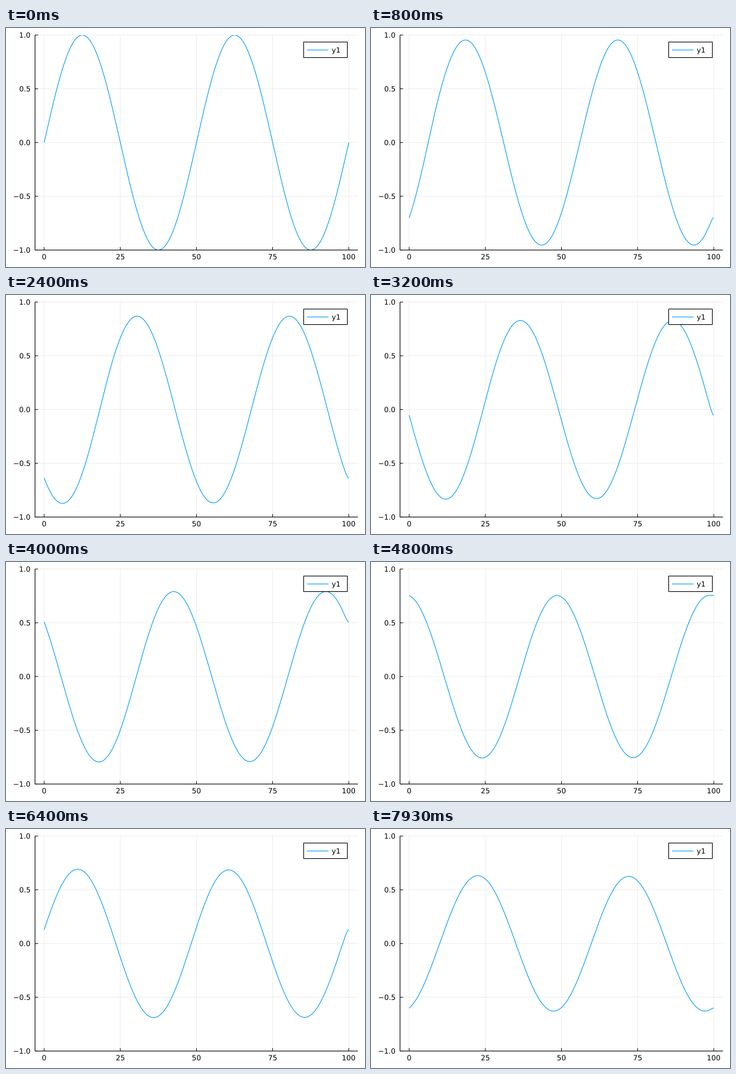
Recreate the animation shown at these times as a matplotlib script. Size 600 by 400 pixels, loop 8 s.

```python
import numpy as np
import matplotlib.pyplot as plt
from matplotlib.animation import FuncAnimation
from matplotlib.patches import PathPatch, Rectangle
from matplotlib.textpath import TextPath
from matplotlib.transforms import Affine2D

W, H, DPI = 600, 400, 100
LOOP, TICK = 8000, 20              # ms
POSES = 120
PX = 72 / DPI                      # one pixel in points
BLUE = "#009afa"
LEFT, RIGHT, TOP, BOTTOM = 48.5, 588.19, 11.81, 371.6
FONT = 12                          # pixels

plt.rcParams["font.family"] = "DejaVu Sans"

# Advection-diffusion: free outflow on the right, fed back in on the left
SPEED, DIFF = 1.0, 0.5
DX, DT, SUBSTEPS = 0.2, 0.01, 50
x = np.linspace(0, 100, 501)


def step(u):
    grad = (u[2:] - u[:-2]) / (2 * DX)
    curve = (u[2:] - 2 * u[1:-1] + u[:-2]) / DX ** 2
    new = u.copy()
    new[1:-1] += DT * (DIFF * curve - SPEED * grad)
    new[-1] = (4 * new[-2] - new[-3]) / 3
    new[0] = new[-1]
    return new


def solve():
    u = np.sin(2 * np.pi * x / 50)
    states = [u]
    for _ in range(POSES - 1):
        for _ in range(SUBSTEPS):
            u = step(u)
        states.append(u)
    return states


def px(v):
    return LEFT + (v + 3) / 106 * (RIGHT - LEFT)


def py(v):
    return BOTTOM - (v + 1) / 2 * (BOTTOM - TOP)


fig = plt.figure(figsize=(W / DPI, H / DPI), dpi=DPI, facecolor="white")
ax = fig.add_axes([0, 0, 1, 1])
ax.set_xlim(0, W)
ax.set_ylim(H, 0)
ax.axis("off")


def stroke(xs, ys, color="black", width=1.0, **kw):
    return ax.plot(xs, ys, color=color, linewidth=width * PX, snap=False,
                   solid_capstyle="butt", **kw)[0]


def label(x0, yc, text, align):
    """Place text by its ink; align is 0 for left, 0.5 for centre, 1 for right."""
    path = TextPath((0, 0), text, size=FONT)
    box = path.get_extents()
    dx = x0 - box.x0 - align * box.width
    flip = Affine2D().scale(1, -1).translate(dx, yc + 0.364 * FONT)
    ax.add_patch(PathPatch(flip.transform_path(path), facecolor="black",
                           linewidth=0, zorder=5))


for v in (0, 25, 50, 75, 100):
    stroke([px(v)] * 2, [TOP, BOTTOM], width=0.7, alpha=0.1, zorder=1)
    stroke([px(v)] * 2, [BOTTOM, BOTTOM - 5], zorder=3)
    label(px(v), 382.8, str(v), 0.5)
for v in (-1, -0.5, 0, 0.5, 1):
    stroke([LEFT, RIGHT], [py(v)] * 2, width=0.7, alpha=0.1, zorder=1)
    stroke([LEFT, LEFT + 5], [py(v)] * 2, zorder=3)
    label(40.1, py(v), f"{v:.1f}".replace("-", "−"), 1)
stroke([LEFT, LEFT], [TOP, BOTTOM], width=1.1, zorder=3)
stroke([LEFT, RIGHT], [BOTTOM, BOTTOM], width=1.1, zorder=3)

states = solve()
line = stroke(px(x), py(states[0]), BLUE, 1.1, zorder=2)
line.set_clip_path(Rectangle((LEFT, TOP), RIGHT - LEFT, BOTTOM - TOP,
                             transform=ax.transData))

# Legend
ax.add_patch(Rectangle((497.5, 23.5), 73, 26, facecolor="white", edgecolor="black",
                       linewidth=1.1 * PX, snap=False, zorder=4))
stroke([503, 539], [36.8, 36.8], BLUE, 1.1, zorder=5)
label(544.7, 36.8, "y1", 0)


def draw(i):
    # poses change at 15 per second, rounded to the clock's ticks
    pose = int((i + 0.75) * TICK * POSES / LOOP)
    line.set_ydata(py(states[min(pose, POSES - 1)]))
    return line,


anim = FuncAnimation(fig, draw, frames=LOOP // TICK, interval=TICK,
                     init_func=lambda: draw(0), repeat=True, repeat_delay=0)
plt.show()
```
